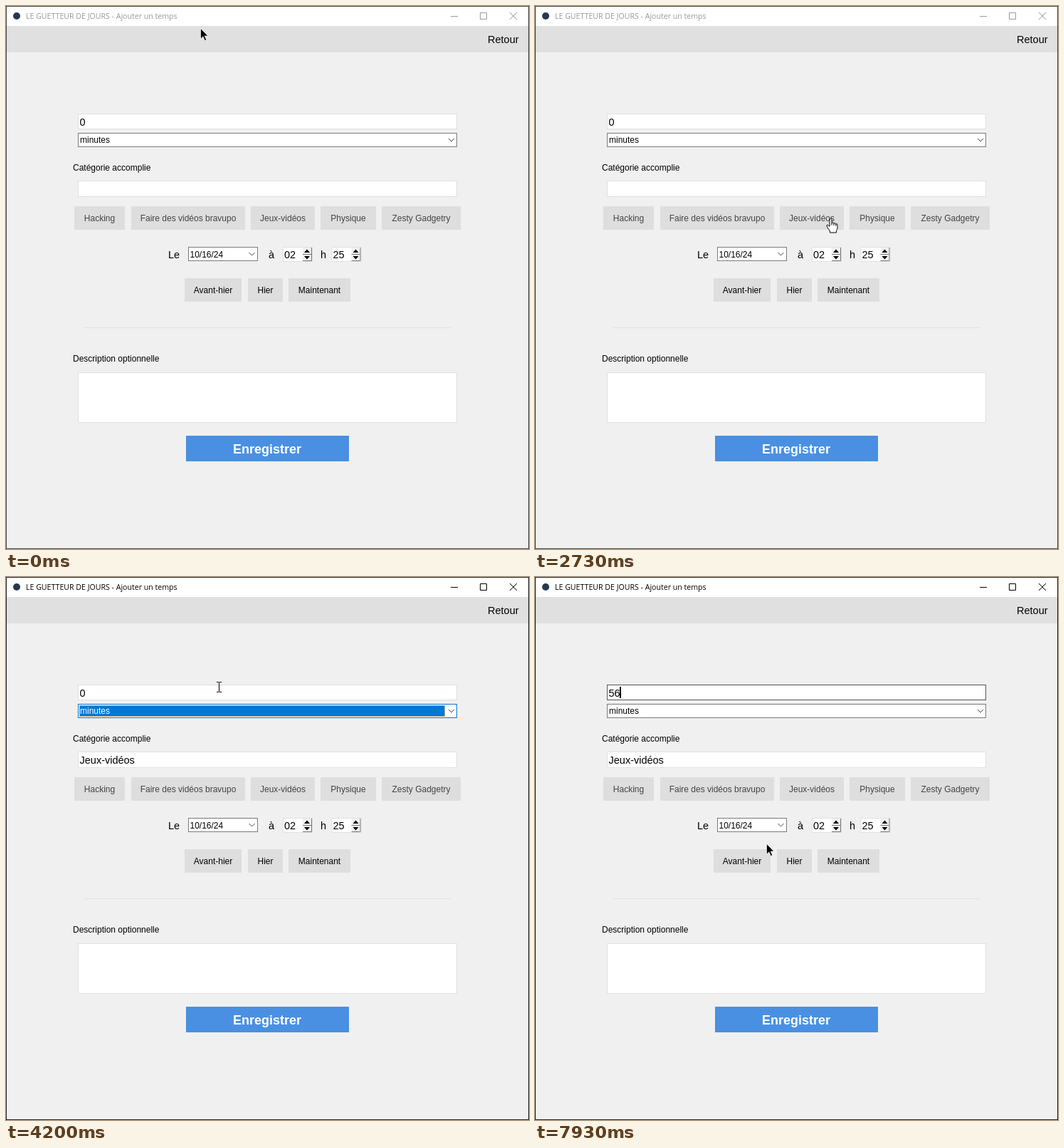
These frames come from a looping animation (735 by 762 pixels, 8000 ms). An HTML page:

```html
<!DOCTYPE html>
<html lang="fr">
<head>
<meta charset="utf-8">
<title>Ajouter un temps</title>
<style>
  html, body { margin: 0; width: 100%; height: 100%; overflow: hidden; background: #f0f0f0; }
  svg { display: block; width: 735px; height: 762px; }
  text { font: 12px "Liberation Sans", Arial, sans-serif; white-space: pre; }
  .big { font-size: 14.5px; }
  .mid { text-anchor: middle; }
  .ui { font: 10.6px "Open Sans", "Noto Sans", sans-serif; }
  .save { font-size: 18px; font-weight: bold; }
</style>
</head>
<body>
<svg id="stage" viewBox="0 0 735 762"></svg>
<script>
const STEP = 8000 / 120;
const ENTRY_LINE = '#e0e0e0', COMBO_LINE = '#7a7a7a', BLUE = '#0078d7';

const rect = (x, y, w, h, fill, extra = '') =>
  `<rect x="${x}" y="${y}" width="${w}" height="${h}" fill="${fill}" ${extra}/>`;
const box = (x, y, w, h, line, id = '') =>
  rect(x + .5, y + .5, w - 1, h - 1, '#fff', `stroke="${line}" ${id && `id="${id}"`}`);
const text = (x, y, str, cls = '', fill = '#000', id = '') =>
  `<text x="${x}" y="${y}" class="${cls}" fill="${fill}" ${id && `id="${id}"`}>${str}</text>`;
const chevron = (x, y) =>
  `<path d="M${x - 4} ${y - 2}l4 4 4-4" fill="none" stroke="#444"/>`;

const buttons = [];
function button(x, y, w, label, color) {
  buttons.push([x, y, w, 33]);
  return rect(x, y, w, 33, '#dedede') + text(x + w / 2, y + 21, label, 'mid', color);
}

function spinner(x, value) {
  const a = x + 28;
  return box(x, 338, 42, 21, ENTRY_LINE) + text(x + 2, 354, value, 'big') +
    rect(a, 339, 12, 19, '#f0f0f0') +
    `<path d="M${a} 348.5h12M${a} 357.5h12M${a + 12.5} 339v19" stroke="#777"/>` +
    `<path d="M${a + 2} 346l4-4.5 4 4.5zM${a + 2} 351l4 4.5 4-4.5z"/>`;
}

const cursors = {
  arrow: '<path d="M0 0V14.5L3.4 11.4 5.9 17 8.2 16 5.8 10.6H10.4Z" stroke="#fff" stroke-width=".7"/>',
  beam: '<path d="M-3.5-7H-1L0-6.5 1-7H3.5M-3.5 7H-1L0 6.5 1 7H3.5M0-6.5V6.5" fill="none" stroke="#000"/>',
  hand: `<path d="M-1.5 1.5Q0-1 1.5 1.5V7Q3.5 5.6 4.5 7.5 6.5 6.3 7.3 8.4 9.5 7.6 9.5 10V14
    Q9.5 16 8 18V20.5H-1V18.5L-5 12.5Q-6.5 9.5-4 9.8L-1.5 12Z" fill="#fff" stroke="#000"/>
    <path d="M1.5 7V10M4.5 7.5V10.5M7.3 8.4V11" stroke="#000"/>`
};

document.getElementById('stage').innerHTML =
  rect(.5, .5, 734, 761, '#f0f0f0', 'id="frame"') +
  rect(1, 1, 733, 27, '#fff') + rect(1, 28, 733, 37, ENTRY_LINE) +
  '<circle cx="15" cy="14" r="5" fill="#26384d"/>' +
  text(28, 18, 'LE GUETTEUR DE JOURS - Ajouter un temps', 'ui', '#999', 'title') +
  '<path id="controls" d="M625 14.5h10M666.5 9.5h9v9h-9zM708 9l10 10M718 9l-10 10" fill="none"/>' +
  text(677, 52, 'Retour', 'big') +

  box(101, 151, 533, 22, ENTRY_LINE, 'amountBox') +
  rect(103, 154, 9, 16, BLUE, 'id="selection"') +
  text(103.5, 168, '0', 'big', '#000', 'amount') +
  rect(111, 154, 2, 16, '#000', 'id="caret"') +
  box(101, 178, 533, 20, COMBO_LINE, 'unitBox') +
  rect(103.5, 180.5, 513, 15, BLUE, 'id="unitFill" stroke="#e08728" stroke-dasharray="1"') +
  text(104, 192, 'minutes', '', '#000', 'unit') + chevron(626, 188) +

  text(94, 231, 'Catégorie accomplie') +
  box(101, 245, 533, 23, ENTRY_LINE) +
  text(103.5, 262, 'Jeux-vidéos', 'big', '#000', 'category') +
  button(96, 281, 71, 'Hacking', '#444') +
  button(176, 281, 160, 'Faire des vidéos bravupo', '#444') +
  button(344, 281, 90, 'Jeux-vidéos', '#444') +
  button(442, 281, 78, 'Physique', '#444') +
  button(528, 281, 111, 'Zesty Gadgetry', '#444') +

  text(228, 354, 'Le', 'big') +
  box(256, 338, 98, 20, COMBO_LINE, 'dateBox') + text(258.5, 353, '10/16/24') + chevron(345.5, 348) +
  text(369, 354, 'à', 'big') + spinner(389, '02') +
  text(442, 354, 'h', 'big') + spinner(457.5, '25') +
  button(251, 382, 80, 'Avant-hier') + button(340, 382, 49, 'Hier') + button(397, 382, 87, 'Maintenant') +
  rect(110, 451, 515, 1, ENTRY_LINE) +

  text(94, 499, 'Description optionnelle') +
  box(101, 514, 533, 71, ENTRY_LINE) +
  rect(253, 603, 229, 36, '#4a90e2') + text(367, 628, 'Enregistrer', 'mid save', '#fff') +

  '<g id="popup">' + box(101, 198, 533, 33, '#000') + rect(102, 199, 531, 15, BLUE) +
  text(103, 211, 'minutes', 'ui', '#fff') + text(103, 226, 'heures', 'ui') + '</g>' +
  Object.entries(cursors).map(([name, d]) => `<g id="${name}">${d}</g>`).join('');

const $ = id => document.getElementById(id);
const show = (id, on) => $(id).setAttribute('visibility', on ? 'visible' : 'hidden');
const set = (id, name, value) => $(id).setAttribute(name, value);

// Pointer waypoints: step, x, y
const path = [
  [0, 273, 31], [4, 400, 80], [7, 461, 170], [10, 420, 270], [13, 330, 339],
  [17, 220, 270], [20, 152, 202], [23, 150, 290], [26, 350, 303],
  [33, 616, 294], [39, 415, 297], [41, 415, 297], [48, 254, 191], [59, 254, 191],
  [63, 299, 154], [67, 299, 154], [70, 304, 157], [113, 304, 157],
  [116, 508, 250], [119, 325, 374]
];
const entries = [[101, 151, 533, 22], [101, 245, 533, 23], [101, 514, 533, 71]];

function pointerAt(step) {
  const i = path.findIndex(p => p[0] >= step);
  if (i < 1) return path[0].slice(1);
  const [s0, x0, y0] = path[i - 1], [s1, x1, y1] = path[i];
  const k = (step - s0) / (s1 - s0);
  return [Math.round(x0 + (x1 - x0) * k), Math.round(y0 + (y1 - y0) * k)];
}

function draw(step) {
  const [px, py] = pointerAt(step);
  const over = ([x, y, w, h]) => px >= x && px < x + w && py >= y && py < y + h;
  const kind = buttons.some(over) ? 'hand' : entries.some(over) ? 'beam' : 'arrow';
  for (const name in cursors) show(name, name === kind);
  set(kind, 'transform', `translate(${px + .5} ${py + .5})`);

  const active = step >= 42;
  set('frame', 'stroke', active ? '#222' : '#444');
  set('title', 'fill', active ? '#000' : '#999');
  set('controls', 'stroke', active ? '#000' : '#999');
  show('category', active);

  const unitFocus = step >= 55 && step < 68;
  const unitSelected = step >= 60 && step < 68;
  const hoverLine = area => over(area) ? '#111' : COMBO_LINE;
  set('unitBox', 'stroke', unitFocus ? BLUE : hoverLine([101, 178, 533, 20]));
  set('dateBox', 'stroke', hoverLine([256, 338, 98, 20]));
  set('unit', 'fill', unitSelected ? '#fff' : '#000');
  show('unitFill', unitSelected);
  show('popup', step >= 55 && step < 60);

  const focused = step >= 68;
  const selected = step >= 86 && step < 103;
  const value = step < 103 ? '0' : step < 107 ? '5' : '56';
  set('amountBox', 'stroke', focused ? '#555' : ENTRY_LINE);
  $('amount').textContent = value;
  set('amount', 'fill', selected ? '#fff' : '#000');
  show('selection', selected);
  // Caret: 600 ms on, 300 ms off
  show('caret', focused && (step < 70 || (step - 70) % 13.5 < 9));
  set('caret', 'x', selected ? 103 : 103 + 8 * value.length);
}

function tick() {
  draw(Math.floor((performance.now() + 4) / STEP) % 120);
  requestAnimationFrame(tick);
}
tick();
</script>
</body>
</html>
```
